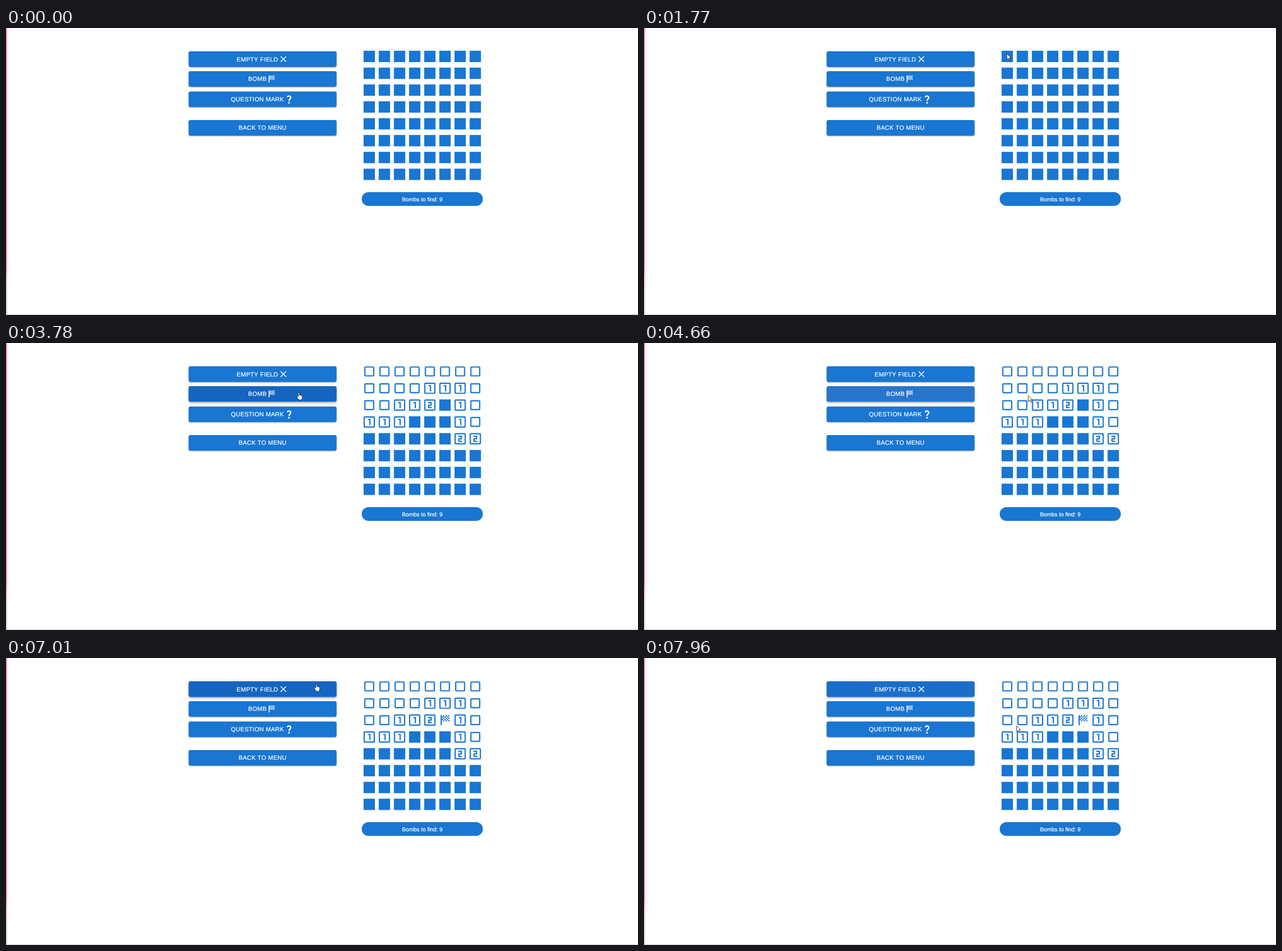
These frames come from a looping animation (1110 px wide and 505 px high, 7.99 s). An HTML page:

```html
<!DOCTYPE html>
<html lang="en">
<head>
<meta charset="utf-8">
<title>Minesweeper</title>
<style>
  html, body { margin: 0; width: 100%; height: 100%; overflow: hidden; background: #fff; }
  #stage { position: relative; width: 1110px; height: 505px; overflow: hidden; }
  #stage > *, #page > * { position: absolute; }
  #page {
    left: 0; top: 0; width: 1461px; height: 665px; transform: scale(.76); transform-origin: 0 0;
    font-family: "Liberation Sans", Arial, sans-serif; color: #fff;
    text-rendering: geometricPrecision; -webkit-text-stroke: .3px #fff;
  }
  .edge { left: 0; top: 0; width: 1px; height: 505px; border-right: 1px solid #f48fb140;
    background: linear-gradient(#f48fb1 0 420px, #f3c3d3 445px, #dcd6d8 460px); }
  .base { left: 0; top: 504px; width: 1110px; height: 1px; background: #c6c6c6; }
  .btn, .chip { display: flex; align-items: center; justify-content: center; }
  .btn {
    left: 422px; width: 342px; height: 36px; border-radius: 4px; overflow: hidden;
    font-size: 14px; letter-spacing: .02857em;
  }
  .btn svg { width: 24px; height: 24px; flex: none; }
  .ripple { position: absolute; border-radius: 50%; background: #fff; }
  .chip {
    left: 822px; top: 380px; width: 280px; height: 32px; border-radius: 16px;
    background: #1976d2; font-size: 13px;
  }
  #board { left: 0; top: 0; width: 1461px; height: 665px; color: #1976d2; }
  #page path { fill: none; stroke: currentColor; stroke-width: 2; stroke-linejoin: round; }
  #page .solid { fill: currentColor; stroke: none; }
  #pointer { left: 0; top: 0; width: 1110px; height: 505px; }
</style>
</head>
<body>
<div id="stage">
  <div class="edge"></div>
  <div class="base"></div>
  <div id="page">
    <svg id="board"></svg>
    <div class="chip">Bombs to find: 9</div>
  </div>
  <svg id="pointer">
    <g id="cursor" fill="#fff" stroke="#222" stroke-width="1.3" stroke-linejoin="round">
      <path id="arrow" transform="scale(.62)" d="M0 0V17L4 13l3 6 2.4-1-2.8-6H12z"/>
      <path id="hand" transform="scale(.6) translate(-6.5 0)" d="M5 1.5C5-.3 8-.3 8 1.5V7c.5-1 2.8-.8 3 .6.8-.9 2.7-.5 2.8.9.9-.6 2.7-.2 2.7 1.4V15c0 2-1.5 3-1.7 6H6.5c-.3-2-2.5-4-4.5-7.5-1-1.8-2-3-1-3.8 1.2-.9 2.7.2 4 2z"/>
    </g>
    <circle id="spot" r="9.2" fill="#ffeb00" fill-opacity=".52"/>
  </svg>
</div>
<script>
const LOOP = 7990, REVEAL = 2360, FLAG = 6230, FADE = 250, RIPPLE = 550;
const SCALE = .76, LEFT = 422, WIDTH = 342, HEIGHT = 36;

const line = d => `<path d="${d}"/>`;
const solid = d => `<path class="solid" d="${d}"/>`;
const box = (x, w) => `<rect x="${x}" y="${x}" width="${w}" height="${w}" rx="1" fill="none" stroke="currentColor" stroke-width="2"/>`;

function checkers() {
  let d = "M5 4h2v16H5z";
  for (let i = 0; i < 15; i++) {
    const row = Math.floor(i / 3);
    d += `M${row % 2 ? 7 + i % 3 * 4 : 9 + i % 3 * 4} ${4 + row * 2}h2v2h-2z`;
  }
  return d;
}

const icons = {
  "#": solid("M3 3h18v18H3z"),
  ".": box(5, 14),
  "1": box(4, 16) + line("M10 8h3v9"),
  "2": box(4, 16) + line("M9 8h5v4h-4v4h5"),
  close: line("M5.7 5.7 18.3 18.3M18.3 5.7 5.7 18.3"),
  flag: solid(checkers()),
  ask: `<path style="stroke-width:2.9" d="M7.9 7.4C8.5 5.4 10 4.4 12 4.4c3.8 0 5 3.6 3.2 6-1.4 1.8-3.2 2.6-3.2 5.6"/>` +
    `<circle cx="12" cy="20" r="2" fill="currentColor"/>`
};
const opened = ["........", "....111.", "..112#1.", "111###1.", "######22", "########", "########", "########"];
const labels = [["EMPTY FIELD", "close"], ["BOMB", "flag"], ["QUESTION MARK", "ask"], ["BACK TO MENU"]];

const linear = k => k, speedUp = k => k ** 3, slowDown = k => 1 - (1 - k) ** 3;
const home = [1077, 495];
// Each move bends through a control point and then rests
const moves = [
  { from: 250, to: 430, via: [978, 341], end: [879, 187], pace: linear },
  { from: 690, to: 1320, via: [720, -18], end: [637.3, 45.3], pace: linear },
  { from: 2830, to: 3600, via: [865, 10], end: [514.3, 87.5], pace: linear },
  { from: 4540, to: 4930, via: [634, 82], end: [753, 104], pace: slowDown },
  { from: 4960, to: 5540, via: [805, 98], end: [766.4, 107], pace: linear },
  { from: 6590, to: 7010, via: [655, 50], end: [545, 46.2], pace: slowDown },
  { from: 7700, to: 7960, via: [600, 70], end: [654.3, 119.3], pace: speedUp }
];
const clicks = [
  { down: 1530, up: 1770 }, { down: 4150, up: 4390, button: 1 },
  { down: 5970, up: 6190 }, { down: 7310, up: 7550, button: 0 }
];

const $ = id => document.getElementById(id);
const clamp = v => Math.min(1, Math.max(0, v));
const mix = (a, b, k) => a + (b - a) * k;

// cubic-bezier(.4, 0, .2, 1)
function ease(p) {
  p = clamp(p);
  let lo = 0, hi = 1, s = p;
  for (let i = 0; i < 20; i++) {
    s = (lo + hi) / 2;
    const x = 1.2 * s * (1 - s) ** 2 + .6 * s * s * (1 - s) + s ** 3;
    if (x < p) lo = s; else hi = s;
  }
  return 3 * s * s * (1 - s) + s ** 3;
}

function pointAt(t) {
  let at = home;
  for (const { from, to, via, end, pace } of moves) {
    if (t < from) break;
    const k = pace(clamp((t - from) / (to - from)));
    at = at.map((a, i) => mix(mix(a, via[i], k), mix(via[i], end[i], k), k));
  }
  return at;
}

const cells = opened.flatMap((row, r) => [...row].map((kind, c) => {
  const el = document.createElementNS("http://www.w3.org/2000/svg", "g");
  el.setAttribute("transform", `translate(${822 + c * 35} ${48.3 + r * 39}) scale(${35 / 24})`);
  $("board").append(el);
  return { el, kind, flagged: r === 2 && c === 5, shown: "" };
}));

const buttons = labels.map(([text, icon], i) => {
  const el = document.createElement("div");
  const top = Math.floor(54 + i * 46.5) + (icon ? 0 : 20);
  el.className = "btn";
  el.style.top = top + "px";
  el.innerHTML = `<span>${text}</span>` +
    (icon ? `<svg viewBox="0 0 24 24">${icons[icon]}</svg>` : "") + `<i class="ripple"></i>`;
  $("page").append(el);
  return { el, top, ripple: el.lastChild };
});

function buttonAt(t) {
  const [x, y] = pointAt(t).map(v => v / SCALE);
  return buttons.findIndex(b => x > LEFT && x < LEFT + WIDTH && y > b.top && y < b.top + HEIGHT);
}

// Walk the pointer path once to learn when each button is hovered
const visits = [];
for (let t = 0, last = -1; t < LOOP; t += 5) {
  const now = buttonAt(t);
  if (now >= 0 && now !== last) visits.push({ button: now, enter: t, leave: t });
  if (now >= 0) visits[visits.length - 1].leave = t + 5;
  last = now;
}

function hoverLevel(index, t) {
  let level = 0;
  for (const { button, enter, leave } of visits) {
    if (button !== index || t < enter) continue;
    level = ease((Math.min(t, leave) - enter) / FADE);
    if (t > leave) level *= 1 - ease((t - leave) / FADE);
  }
  return level;
}

function paintRipple({ top, ripple }, index, t) {
  const hit = clicks.find(c => c.button === index && t >= c.down && t < c.up + RIPPLE);
  ripple.style.opacity = 0;
  if (!hit) return;
  const [px, py] = pointAt(hit.down), x = px / SCALE - LEFT, y = py / SCALE - top;
  const reach = Math.hypot(Math.max(x, WIDTH - x), Math.max(y, HEIGHT - y));
  const grow = ease((t - hit.down) / RIPPLE), r = reach * grow;
  Object.assign(ripple.style, {
    left: x - r + "px", top: y - r + "px", width: 2 * r + "px", height: 2 * r + "px",
    opacity: mix(.1, .3, grow) * (1 - ease((t - hit.up) / RIPPLE))
  });
}

function paintButton(button, index, t) {
  const k = hoverLevel(index, t), px = (a, b) => mix(a, b, k) + "px";
  const { style } = button.el;
  style.background = `rgb(${mix(25, 21, k)}, ${mix(118, 101, k)}, ${mix(210, 192, k)})`;
  style.boxShadow =
    `0 ${px(3, 2)} ${px(1, 4)} ${px(-2, -1)} rgba(0,0,0,.2),` +
    `0 ${px(2, 4)} ${px(2, 5)} rgba(0,0,0,.14),` +
    `0 1px ${px(5, 10)} rgba(0,0,0,.12)`;
  paintRipple(button, index, t);
}

function paintCell(cell, t) {
  const name = t < REVEAL ? "#" : cell.flagged && t >= FLAG ? "flag" : cell.kind;
  if (name === cell.shown) return;
  cell.el.innerHTML = icons[name];
  cell.shown = name;
}

function render(t) {
  cells.forEach(c => paintCell(c, t));
  buttons.forEach((b, i) => paintButton(b, i, t));

  const place = `translate(${pointAt(t).join(" ")})`;
  const over = buttonAt(t) >= 0;
  const show = (id, on) => $(id).setAttribute("visibility", on ? "visible" : "hidden");
  $("cursor").setAttribute("transform", place);
  $("spot").setAttribute("transform", place);
  show("arrow", t >= moves[0].from && !over);
  show("hand", over);
  show("spot", clicks.some(c => t >= c.down && t < c.up));
}

const start = performance.now();
function tick() {
  render((performance.now() - start) % LOOP);
  requestAnimationFrame(tick);
}
tick();
</script>
</body>
</html>
```
